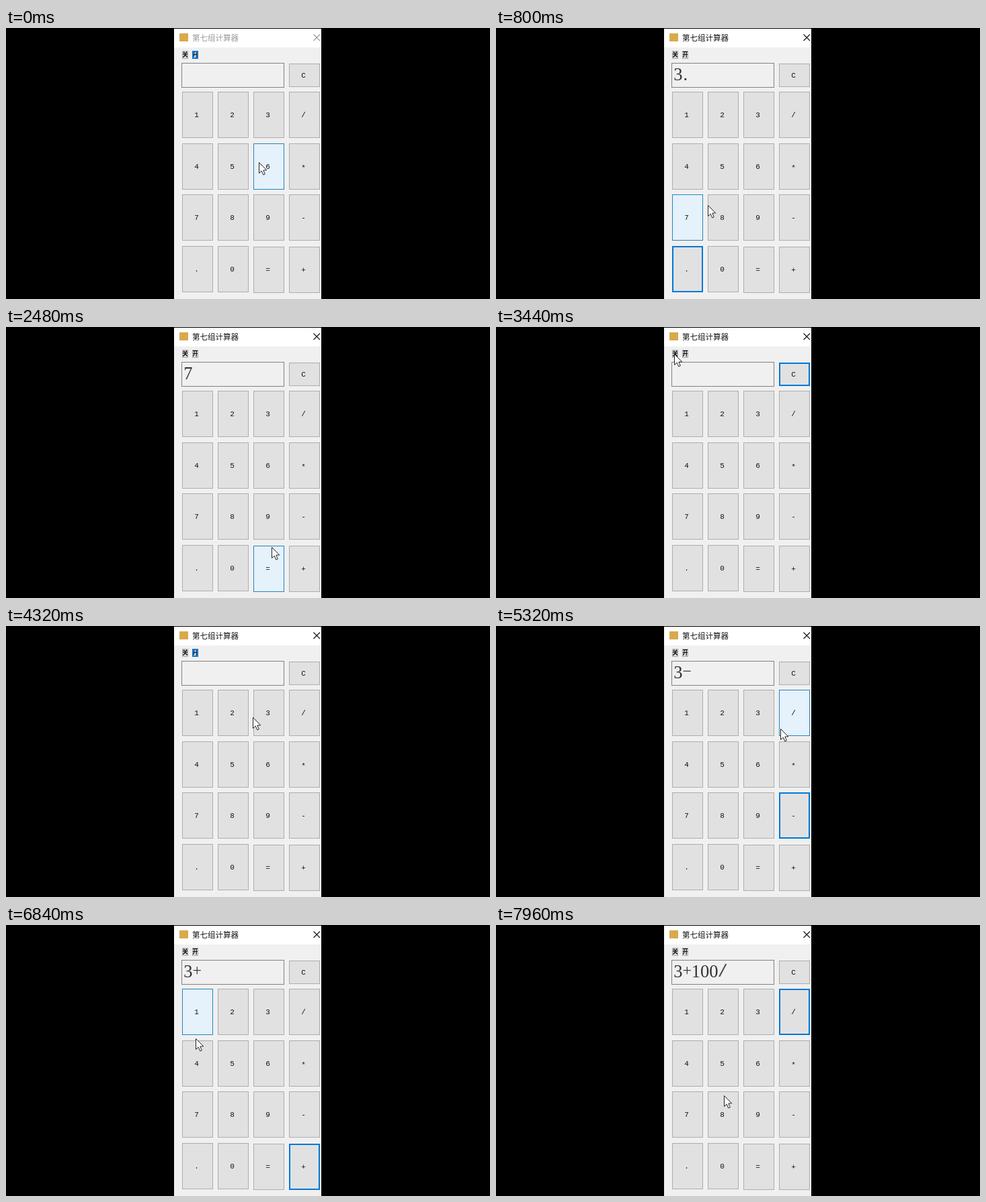
Recreate the animation shown at these times as an HTML page with a canvas. Size 720 by 404 pixels, loop 8 s.

```html
<!DOCTYPE html>
<html lang="zh">
<head>
<meta charset="utf-8">
<style>
  html, body { margin: 0; width: 100%; height: 100%; overflow: hidden; background: #000; }
  canvas { display: block; width: 720px; height: 404px; }
</style>
</head>
<body>
<canvas id="stage"></canvas>
<script>
const LOOP = 8000, STEP = 40, PRESS = 80, BLUE = '#0078d7';
const SANS = '"Noto Sans CJK SC", "Noto Sans CJK", sans-serif';
const MONO = '"Liberation Mono", monospace';
const SERIF = '"Liberation Serif", serif';

const canvas = document.getElementById('stage');
const ctx = canvas.getContext('2d');
const scale = window.devicePixelRatio || 1;
canvas.width = 720 * scale;
canvas.height = 404 * scale;

// Keypad layout
const keys = [{ id: 'C', x: 421, y: 53, w: 45, h: 34 }];
['123/', '456*', '789-', '.0=+'].forEach((row, r) => {
  [...row].forEach((id, c) => {
    const y = r === 3 && c > 1 ? 326 : Math.floor(95.6 + 76.5 * r);
    keys.push({ id, x: 262 + 53 * c, y, w: 45, h: 68 });
  });
});
const switches = ['关', '开'].map((id, i) => ({ id, x: 262 + 15 * i, y: 34, w: 8, h: 11 }));
const buttons = [...keys, ...switches];

// Click times, in key order
const order = '3.5*2=C关开3-/*+100/';
const times = [280, 640, 960, 1240, 1880, 2320, 2920, 3480, 3920,
  4520, 5000, 5480, 5840, 6280, 6960, 7240, 7400, 7680];
const isOp = ch => '+-*/'.includes(ch);

function typed(shown, id) {
  if ('C关开'.includes(id)) return '';
  if (id === '=') {
    const [a, b] = shown.split('*');
    return String(a * b);
  }
  const replace = shown && isOp(id) && isOp(shown.slice(-1));
  return (replace ? shown.slice(0, -1) : shown) + id;
}

let shown = '';
const clicks = times.map((time, i) => {
  const id = order[i];
  shown = typed(shown, id);
  return { time, id, shown };
});

// Places the pointer passes between clicks, plus a short rest on each clicked key
const path = [
  [0, 376, 200], [1480, 359, 296], [2480, 395, 328], [4320, 367, 136],
  [5320, 423, 153], [6760, 284, 155], [6840, 282, 169],
  [7920, 354, 244], [7960, 339, 254]
];
clicks.forEach(({ time, id }) => {
  const b = buttons.find(k => k.id === id);
  const x = b.x + b.w * 0.42, y = b.y + b.h * 0.56;
  path.push([time - PRESS, x, y], [time + STEP, x, y]);
});
path.sort((a, b) => a[0] - b[0]);

function pointerAt(t) {
  const i = Math.max(1, path.findIndex(p => p[0] >= t));
  const [t0, x0, y0] = path[i - 1], [t1, x1, y1] = path[i];
  const u = Math.max(0, Math.min(1, (t - t0) / (t1 - t0)));
  const k = u * u * (3 - 2 * u);
  return { x: x0 + (x1 - x0) * k, y: y0 + (y1 - y0) * k };
}

const inside = (b, p) => p.x >= b.x && p.x <= b.x + b.w && p.y >= b.y && p.y <= b.y + b.h;

function fill(x, y, w, h, color) {
  ctx.fillStyle = color;
  ctx.fillRect(x, y, w, h);
}

function box(b, back, edge, line = 1) {
  fill(b.x, b.y, b.w + 1, b.h + 1, edge);
  fill(b.x + line, b.y + line, b.w + 1 - 2 * line, b.h + 1 - 2 * line, back);
}

function text(s, x, y, font, color, align = 'left') {
  ctx.font = font;
  ctx.textAlign = align;
  ctx.fillStyle = color;
  ctx.fillText(s, x, y);
}

function drawTitle(active) {
  const color = active ? '#111' : '#999';
  fill(250, 1, 219, 28, '#fff');
  fill(258, 8, 13, 12, '#d9a94c');
  text('第七组计算器', 277, 18.5, '11.5px ' + SANS, color);
  ctx.strokeStyle = color;
  ctx.lineWidth = 1.1;
  ctx.beginPath();
  ctx.moveTo(457.5, 9.5); ctx.lineTo(467, 19);
  ctx.moveTo(467, 9.5); ctx.lineTo(457.5, 19);
  ctx.stroke();
}

function drawSwitch(b, focused) {
  const m = focused ? 2 : 1;
  box(b, '#dedede', focused ? BLUE : '#adadad', m);
  ctx.save();
  ctx.beginPath();
  ctx.rect(b.x + m, b.y + m, b.w + 1 - 2 * m, b.h + 1 - 2 * m);
  ctx.clip();
  text(b.id, b.x + 4.5, b.y + 9, 'bold 9px ' + SANS, '#111', 'center');
  ctx.restore();
}

function drawKey(b, hover, focused, pressed) {
  if (pressed) box(b, '#cce4f7', '#005499');
  else if (hover) box(b, '#e5f1fb', '#2485bd');
  else if (focused) box(b, '#e1e1e1', BLUE, 2);
  else box(b, '#e1e1e1', '#adadad');
  const drop = b.id === '*' ? 2 : 0;
  text(b.id, b.x + 21.5, b.y + b.h / 2 + 3.7 + drop, '11px ' + MONO, '#111', 'center');
}

// Fixed-width cells with raised operators
function drawDisplay(s) {
  box({ x: 261, y: 52, w: 152, h: 36 }, '#f0f0f0', '#828282');
  [...s].forEach((ch, i) => {
    const x = 264.3 + i * 13.25, mid = x + 6.6;
    if (ch === '.') text(ch, x + 1, 78, '26.5px ' + SERIF, '#333');
    else if (ch === '/') text(ch, mid, 77, '25px ' + MONO, '#444', 'center');
    else if (ch === '*') text(ch, mid, 81, '26.5px ' + SERIF, '#333', 'center');
    else if (isOp(ch)) text(ch.replace('-', '−'), mid, 75, '24px ' + SERIF, '#333', 'center');
    else text(ch, mid, 78, '26.5px ' + SERIF, '#333', 'center');
  });
}

const arrow = new Path2D('M0 0V16L3.7 12.6L6.3 18.4L8.8 17.3L6.3 11.6L11.2 11.4Z');

function drawPointer(p) {
  ctx.save();
  ctx.translate(Math.round(p.x) + 0.5, Math.round(p.y) + 0.5);
  ctx.fillStyle = '#fff';
  ctx.fill(arrow);
  ctx.strokeStyle = '#222';
  ctx.lineWidth = 1;
  ctx.stroke(arrow);
  ctx.restore();
}

function draw(t) {
  const last = clicks.filter(c => c.time <= t).pop() || { id: '开', shown: '' };
  const down = clicks.find(c => t >= c.time - PRESS && t < c.time);
  // Hover trails the pointer slightly
  const felt = pointerAt(Math.max(0, t - STEP));

  ctx.setTransform(scale, 0, 0, scale, 0, 0);
  fill(0, 0, 720, 404, '#000');
  fill(250, 1, 219, 403, '#f0f0f0');
  drawTitle(t >= 200);
  switches.forEach(b => drawSwitch(b, last.id === b.id));
  drawDisplay(last.shown);
  keys.forEach(b => drawKey(b, inside(b, felt), last.id === b.id, down && down.id === b.id));
  drawPointer(pointerAt(t));
}

const start = performance.now();
function tick() {
  const t = (performance.now() - start) % LOOP;
  draw(Math.floor(t / STEP) * STEP);
  requestAnimationFrame(tick);
}
tick();
</script>
</body>
</html>
```
